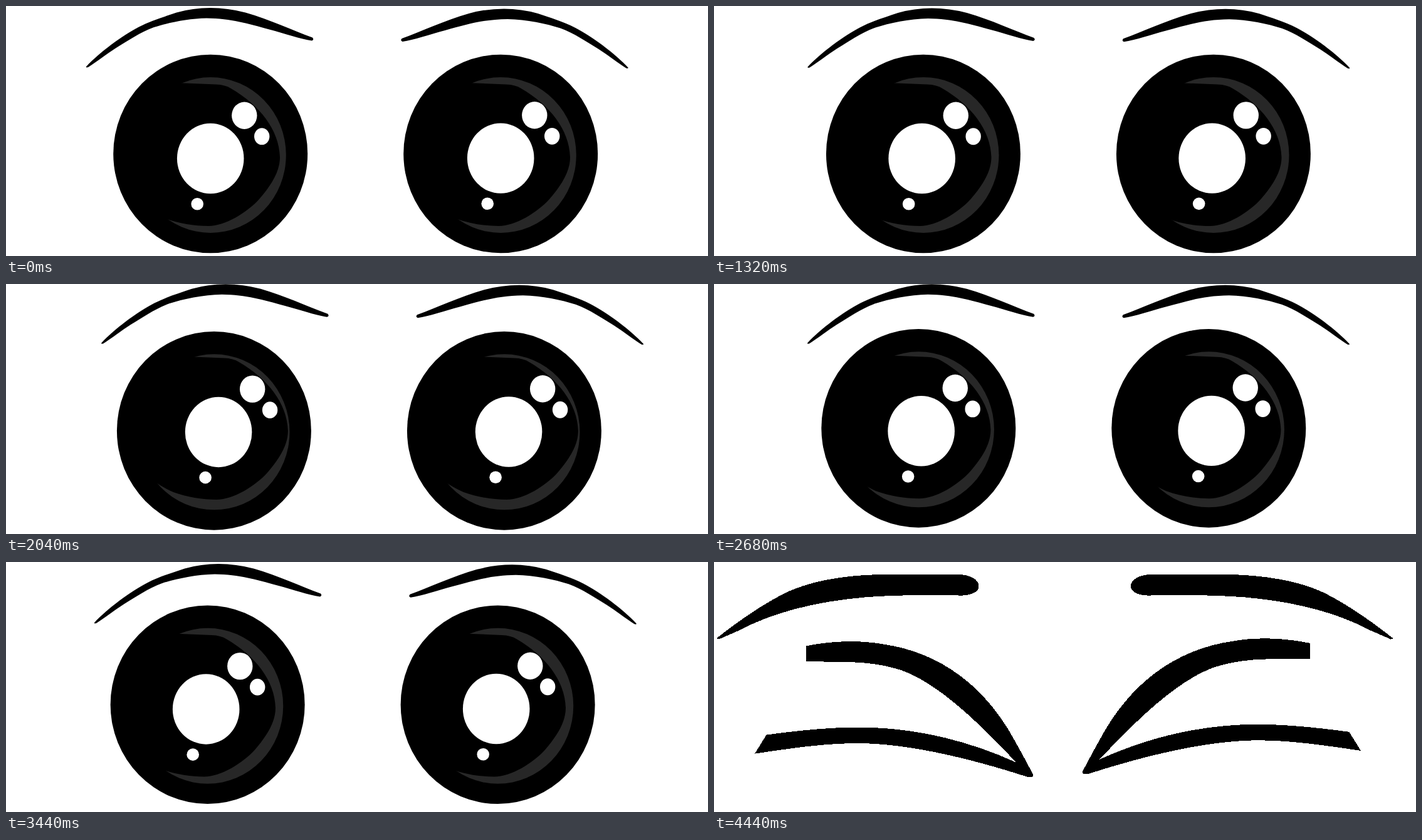
Recreate the animation shown at these times as an HTML page. Size 1120 px wide and 400 px high, loop 4640 ms.

```html
<!DOCTYPE html>
<html lang="en">
<head>
<meta charset="utf-8">
<title>Blinking eyes</title>
<style>
html, body { margin: 0; width: 100%; height: 100%; overflow: hidden; background: #fff; }
svg { display: block; width: 100%; height: 100%; }
</style>
</head>
<body>
<svg viewBox="0 0 1120 400">
  <defs>
    <path id="brow" d="M128 97 C148 75 186 47 212 33.5 C232 23 252 17.5 272 10.5 Q298 3 326 3
      Q354 3 382 10.5 C422 22 457 39 489 50.5 Q492 54 488 55.5 C470 53 445 44 420 37.5
      C385 28 360 20 320 19.5 C290 20 258 27 236 34 C214 42 194 56 175 67.5 C160 77 145 89 131 98 Q127 99 128 97Z"/>
    <g id="iris">
      <ellipse cx="326.2" cy="236.5" rx="155" ry="158.8"/>
      <ellipse cx="326.3" cy="238.5" rx="120.5" ry="124.5" fill="#272727"/>
    </g>
    <!-- Dark disc that leaves a crescent of the iris visible -->
    <path id="disc" d="M262 122.5 L335 125.5 Q350 126 359 132 C404 158 436 198 437 242
      C437 265 423 287 404 309 C385 330 350 352 323 352 C300 352 276 348 254 340
      Q238 333 224 323 C190 290 185 200 215 160 Q235 135 262 122.5Z"/>
    <g id="shine" fill="#fff">
      <ellipse cx="326.2" cy="244" rx="53.3" ry="56.2"/>
      <ellipse cx="380.3" cy="175.2" rx="20.2" ry="21.7"/>
      <ellipse cx="408.2" cy="208.7" rx="12.2" ry="13.4"/>
      <circle cx="305.2" cy="316.7" r="9.8"/>
    </g>
    <path id="squintBrow" d="M5 122 C38 96 72 72 108 53 C150 31 210 20.5 275 20.5 H390
      C410 21 422 29 422 39 C422 48 408 54 390 53 C340 52 290 52 240 56 C150 64 85 85 40 109 L8 123Z"/>
    <path id="squintLids" d="M147 135 C180 128 227 124 270 132 C366 146 433 204 476 280 Q495 314 509 341
      L508 343 H499 C409 314 309 290 230 289.5 C175 289.5 120 298 66 306 L84 277
      C135 270 190 265 230 265 C320 265 405 286 484 322 C425 259 360 195 300 173 C255 158 215 159 147 159Z"/>
  </defs>

  <g id="open">
    <g id="brows">
      <use href="#brow"/>
      <use href="#brow" transform="translate(1120.5 1.4) scale(-1 1)"/>
    </g>
    <g id="irises">
      <use href="#iris"/>
      <use href="#iris" x="463"/>
    </g>
    <g id="pupils">
      <use href="#disc"/>
      <use href="#shine"/>
      <use href="#disc" x="463"/>
      <use href="#shine" x="463" y="-.4"/>
    </g>
  </g>

  <g id="shut" shape-rendering="crispEdges" stroke="#000">
    <use href="#squintBrow"/>
    <use href="#squintBrow" transform="translate(1087.5 0) scale(-1 1)"/>
    <use href="#squintLids"/>
    <use href="#squintLids" transform="translate(1097 -4.7) scale(-1 1)"/>
  </g>
</svg>
<script>
const LOOP = 4640, STEP = 40, BLINK_START = 4440;
const byId = id => document.getElementById(id);

// Every part leaves its rest pose, drifts, and is back at rest for the blink:
// a sum of sine harmonics over the time the eyes stay open.
const drift = (phase, ...amplitudes) =>
  amplitudes.reduce((sum, a, k) => sum + a * Math.sin((k + 1) * phase), 0);

function place(id, x, y) {
  byId(id).setAttribute('transform', `translate(${x} ${y})`);
}

function draw(elapsed) {
  const t = Math.floor((elapsed % LOOP) / STEP) * STEP;
  const blinking = t >= BLINK_START;
  byId('open').style.display = blinking ? 'none' : '';
  byId('shut').style.display = blinking ? '' : 'none';

  const phase = Math.PI * t / (BLINK_START - STEP);
  place('brows', drift(phase, 24, 2.2), drift(phase, -1.2, .9, 1.8));
  place('irises', drift(phase, 3.3, 5.7, -1.2), drift(phase, -4.2, 4.1, -1.7));
  place('pupils', drift(phase, 6, 6.3, -3.5, 1.5, 3.4), drift(phase, -6.8, 4.6, 0, .4, -1.4));
}

let start;
function tick(now) {
  start ??= now;
  draw(now - start);
  requestAnimationFrame(tick);
}
draw(0);
requestAnimationFrame(tick);
</script>
</body>
</html>
```
